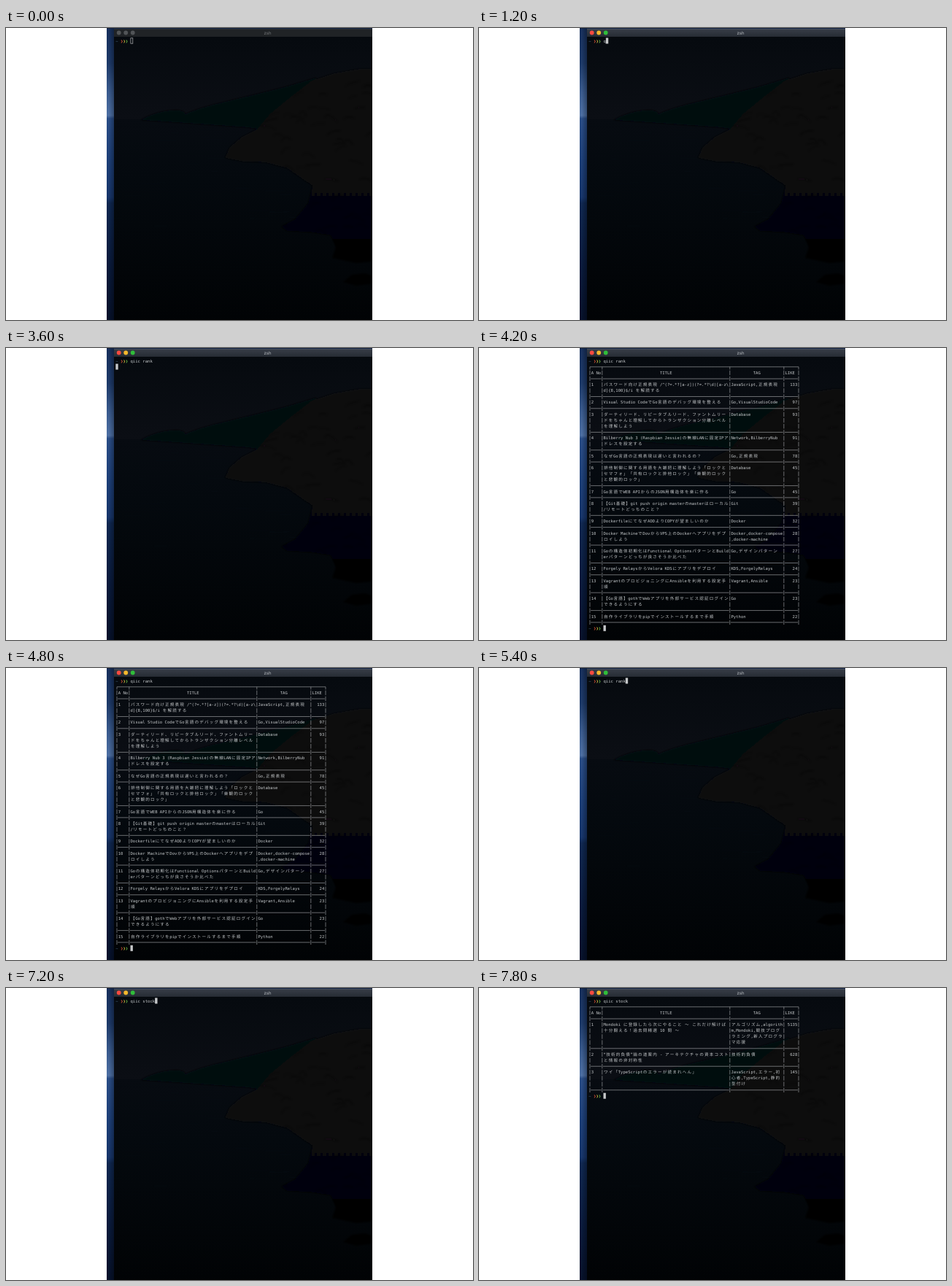
An HTML page that plays this animation: 640x400 px, repeating every 8000 ms.

```html
<!DOCTYPE html>
<html lang="ja">
<head>
<meta charset="utf-8">
<title>zsh</title>
<style>
html, body { margin: 0; width: 100%; height: 100%; overflow: hidden; background: #fff; }
svg { display: block; width: 640px; height: 400px; }
#screen text {
  font: 5.59px 'DejaVu Sans Mono', 'Noto Sans CJK JP', 'Noto Sans CJK', monospace;
  fill: #c3c6c8; white-space: pre; text-rendering: geometricPrecision;
}
#title { font: 6px Inter, sans-serif; text-anchor: middle; text-rendering: geometricPrecision; }
</style>
</head>
<body>
<svg viewBox="0 0 640 400" xmlns="http://www.w3.org/2000/svg">
  <defs>
    <linearGradient id="desk" x2="0" y2="1">
      <stop offset="0" stop-color="#18305c"/>
      <stop offset=".12" stop-color="#1d3968"/>
      <stop offset=".22" stop-color="#3a5b8e"/>
      <stop offset=".3" stop-color="#4d6fa3"/>
      <stop offset=".31" stop-color="#2a4d86"/>
      <stop offset=".45" stop-color="#1d3f78"/>
      <stop offset=".58" stop-color="#17356a"/>
      <stop offset=".6" stop-color="#0f2750"/>
      <stop offset=".8" stop-color="#0a1b3d"/>
      <stop offset="1" stop-color="#06112a"/>
    </linearGradient>
    <linearGradient id="edge">
      <stop offset=".3" stop-color="#000" stop-opacity="0"/>
      <stop offset="1" stop-color="#000" stop-opacity=".3"/>
    </linearGradient>
    <linearGradient id="sky" x2="0" y2="1">
      <stop offset="0" stop-color="#060a0f"/>
      <stop offset="1" stop-color="#0b0e14"/>
    </linearGradient>
    <linearGradient id="sea" x2="0" y2="1">
      <stop offset="0" stop-color="#070b11"/>
      <stop offset=".3" stop-color="#04090e"/>
      <stop offset="1" stop-color="#010305"/>
    </linearGradient>
    <linearGradient id="land" x2="0" y2="1">
      <stop offset="0" stop-color="#0a0a0c"/>
      <stop offset="1" stop-color="#050506"/>
    </linearGradient>
    <linearGradient id="bar" x2="0" y2="1">
      <stop offset="0" stop-color="#383e48"/>
      <stop offset="1" stop-color="#272c34"/>
    </linearGradient>
    <filter id="soft"><feGaussianBlur stdDeviation=".8"/></filter>
    <clipPath id="win"><rect x="148" y="1" width="354" height="399"/></clipPath>
    <clipPath id="coast"><use href="#cliff"/><use href="#rock"/></clipPath>
  </defs>
  <rect x="138" width="364" height="400" fill="url(#desk)"/>
  <rect x="138" width="10" height="400" fill="url(#edge)"/>
  <rect x="138" width="364" height="1" fill="#10203f"/>
  <g clip-path="url(#win)">
    <rect x="148" y="12" width="354" height="114" fill="url(#sky)"/>
    <rect x="148" y="125" width="354" height="275" fill="url(#sea)"/>
    <g id="waves" stroke="#0a1118" stroke-width=".6"/>
    <g filter="url(#soft)">
      <path d="M184 126Q204 115 224 113T246 118Q262 110 300 101T385 80L425 68V150L330 136Q260 131 184 126Z" fill="#06080c"/>
      <path id="cliff" d="M300 178L306 164L322 150L345 138L362 118L390 95L420 72L450 62L485 56L504 56V320L480 322L447 315L452 300L445 284L420 280L385 278L377 272L396 262L414 240L420 216L408 208L385 192L355 184L325 183Z" fill="url(#land)"/>
      <path id="rock" d="M462 348L474 338L492 336L504 340V350L480 353Z" fill="#050506"/>
    </g>
    <g clip-path="url(#coast)"><g id="cracks" fill="none" stroke="#141214" stroke-width=".8" filter="url(#soft)"/></g>
    <rect x="148" y="399" width="354" height="1" fill="#010102"/>
    <rect id="top" x="148" y="1" width="354" height="11"/>
    <rect id="gloss" x="148" y="1" width="354" height=".8" fill="#4a5363"/>
    <g id="lights"></g>
    <text id="title" x="358.5" y="8.9">zsh</text>
  </g>
  <g id="screen"></g>
</svg>
<script>
const NS = 'http://www.w3.org/2000/svg';
const $ = id => document.getElementById(id);
const LEFT = 150.3, CELL = 3.365, TOP = 13.5, LINE = 8.14;
const BARS = [0, 5, 57, 79, 85];
const STEP = 600, LOOP = 8000;

function add(parent, tag, attrs) {
  const el = document.createElementNS(NS, tag);
  for (const k in attrs) el.setAttribute(k, attrs[k]);
  parent.appendChild(el);
  return el;
}

let seed = 7;
function rnd(a, b) {
  seed = (seed * 16807) % 2147483647;
  return a + (b - a) * seed / 2147483647;
}

function scenery() {
  for (let i = 0; i < 80; i++) {
    const x = rnd(148, 440), y = 128 + 150 * rnd(0, 1) ** 1.5;
    add($('waves'), 'path', { d: `M${x} ${y}h${rnd(6, 28)}`, opacity: rnd(.2, .7) });
  }
  for (let i = 0; i < 100; i++) {
    const x = rnd(305, 500), y = rnd(65, 350);
    add($('cracks'), 'path', {
      d: `M${x} ${y}q${rnd(3, 9)} ${rnd(-9, 0)} ${rnd(9, 20)} ${rnd(-8, 6)}`, opacity: rnd(.3, .9)
    });
  }
  for (let i = 0; i < 3; i++) add($('lights'), 'circle', { cx: 154.7 + 9.5 * i, cy: 6.5, r: 2.9 });
}

// One cell per narrow character, two per wide one.
const wide = c => c.charCodeAt(0) > 0x2e7f;

function write(col, row, str, fill) {
  const xs = [];
  for (const c of str) {
    xs.push((LEFT + col * CELL + (wide(c) ? .5 : 0)).toFixed(2));
    col += wide(c) ? 2 : 1;
  }
  const el = add($('screen'), 'text', { x: xs.join(' '), y: TOP + row * LINE + 6 });
  if (fill) el.style.fill = fill;
  el.textContent = str;
}

function prompt(row, cmd = '') {
  write(0, row, '~', '#4a6a86');
  ['#ee5a3c', '#e8cf45', '#74cf4e'].forEach((c, i) => write(2 + i, row, '❯', c));
  if (cmd) write(6, row, cmd);
}

function cursor(col, row, hollow) {
  const x = LEFT + col * CELL, y = TOP + row * LINE;
  add($('screen'), 'rect', hollow
    ? { x: x + .4, y: y + .3, width: 2.9, height: 7.4, fill: 'none', stroke: '#b4b6b8', 'stroke-width': .7 }
    : { x, y, width: CELL, height: 8, fill: '#c6c8ca' });
}

const barX = i => LEFT + (BARS[i] + .5) * CELL;
const stroke = d => add($('screen'), 'path', { d, fill: 'none', stroke: '#a2a5a7', 'stroke-width': .65 });

function bars(row) {
  const y = TOP + row * LINE + 1;
  stroke(BARS.map((_, i) => `M${barX(i)} ${y}v6.4`).join(''));
}

function rule(row) {
  const y = TOP + row * LINE + 4.2;
  bars(row);
  stroke(BARS.slice(1).map((_, i) => `M${barX(i) + 1.1} ${y}H${barX(i + 1) - 1.1}`).join(''));
}

// Draws the table and returns the row below it.
function table(items) {
  const y = TOP + LINE + 4.2;
  stroke(`M${barX(0)} ${y}H${barX(4)}` + BARS.map((_, i) => `M${barX(i)} ${y}v3.6`).join(''));
  bars(2);
  write(1, 2, 'A No');
  write(29, 2, 'TITLE');
  write(67, 2, 'TAG');
  write(80, 2, 'LIKE');
  rule(3);
  let row = 4;
  items.forEach(([title, tag, like], n) => {
    const a = title.split('\n'), b = tag.split('\n');
    write(1, row, String(n + 1));
    write(80, row, String(like).padStart(5));
    for (let i = 0; i < Math.max(a.length, b.length); i++, row++) {
      bars(row);
      if (a[i]) write(6, row, a[i]);
      if (b[i]) write(58, row, b[i]);
    }
    rule(row++);
  });
  return row;
}

const RANK = [
  ['パスワード向け正規表現 /^(?=.*?[a-z])(?=.*?\\d)[a-z\\\nd]{8,100}$/i を解読する', 'JavaScript,正規表現', 133],
  ['Visual Studio CodeでGo言語のデバッグ環境を整える', 'Go,VisualStudioCode', 97],
  ['ダーティリード、リピータブルリード、ファントムリー\nドをちゃんと理解してからトランザクション分離レベル\nを理解しよう', 'Database', 93],
  ['Bilberry Nub 3 (Raspbian Jessie)の無線LANに固定IPア\nドレスを設定する', 'Network,BilberryNub', 91],
  ['なぜGo言語の正規表現は遅いと言われるの？', 'Go,正規表現', 78],
  ['排他制御に関する用語を大雑把に理解しよう「ロックと\nセマフォ」「共有ロックと排他ロック」「楽観的ロック\nと悲観的ロック」', 'Database', 45],
  ['Go言語でWEB APIからのJSON用構造体を楽に作る', 'Go', 45],
  ['【Git基礎】git push origin masterのmasterはローカル\n/リモートどっちのこと？', 'Git', 39],
  ['DockerfileにてなぜADDよりCOPYが望ましいのか', 'Docker', 32],
  ['Docker MachineでDovからVPS上のDockerへアプリをデプ\nロイしよう', 'Docker,docker-compose\n,docker-machine', 28],
  ['Goの構造体初期化はFunctional OptionsパターンとBuild\nerパターンどっちが良さそうか比べた', 'Go,デザインパターン', 27],
  ['Forgely RelaysからVelora KDSにアプリをデプロイ', 'KDS,ForgelyRelays', 24],
  ['VagrantのプロビジョニングにAnsibleを利用する設定手\n順', 'Vagrant,Ansible', 23],
  ['【Go言語】gothでWebアプリを外部サービス認証ログイン\nできるようにする', 'Go', 23],
  ['自作ライブラリをpipでインストールするまで手順', 'Python', 22]
];

const STOCK = [
  ['Mondoki に登録したら次にやること ～ これだけ解けば\n十分闘える！過去問精選 10 問 ～', 'アルゴリズム,algorith\nm,Mondoki,競技プログ\nラミング,新人プログラ\nマ応援', 5135],
  ['“技術的負債”論の道案内 - アーキテクチャの資本コスト\nと情報の非対称性', '技術的負債', 628],
  ['ワイ「TypeScriptのエラーが読まれへん」', 'JavaScript,エラー,初\n心者,TypeScript,静的\n型付け', 145]
];

const typed = cmd => () => { prompt(0, cmd); cursor(6 + cmd.length, 0); };
const listed = (cmd, items) => () => {
  prompt(0, cmd);
  const row = table(items);
  prompt(row);
  cursor(6, row);
};
const rank = listed('qiic rank', RANK);

const STATES = [
  () => { prompt(0); cursor(6, 0, true); },
  typed(''),
  typed('q'),
  typed('qiic'),
  typed('qiic ra'),
  typed('qiic rank'),
  () => { prompt(0, 'qiic rank'); cursor(0, 1); },
  rank,
  rank,
  typed('qiic rank'),
  typed('qiic '),
  typed('qiic st'),
  typed('qiic stock'),
  listed('qiic stock', STOCK)
];

function focus(on) {
  $('top').setAttribute('fill', on ? 'url(#bar)' : '#202326');
  $('gloss').setAttribute('opacity', on ? 1 : .35);
  $('title').setAttribute('fill', on ? '#b9bdc2' : '#75787b');
  const colors = on ? ['#fa4a40', '#f5b82c', '#30bd3a'] : Array(3).fill('#515457');
  [...$('lights').children].forEach((c, i) => c.setAttribute('fill', colors[i]));
}

let shown = -1;
function draw(ms) {
  const n = Math.floor(ms % LOOP / STEP);
  if (n === shown) return;
  shown = n;
  $('screen').replaceChildren();
  focus(n > 0);
  STATES[n]();
}

scenery();
draw(0);
let start;
function tick(now) {
  start ??= now;
  draw(now - start);
  requestAnimationFrame(tick);
}
requestAnimationFrame(tick);
</script>
</body>
</html>
```
